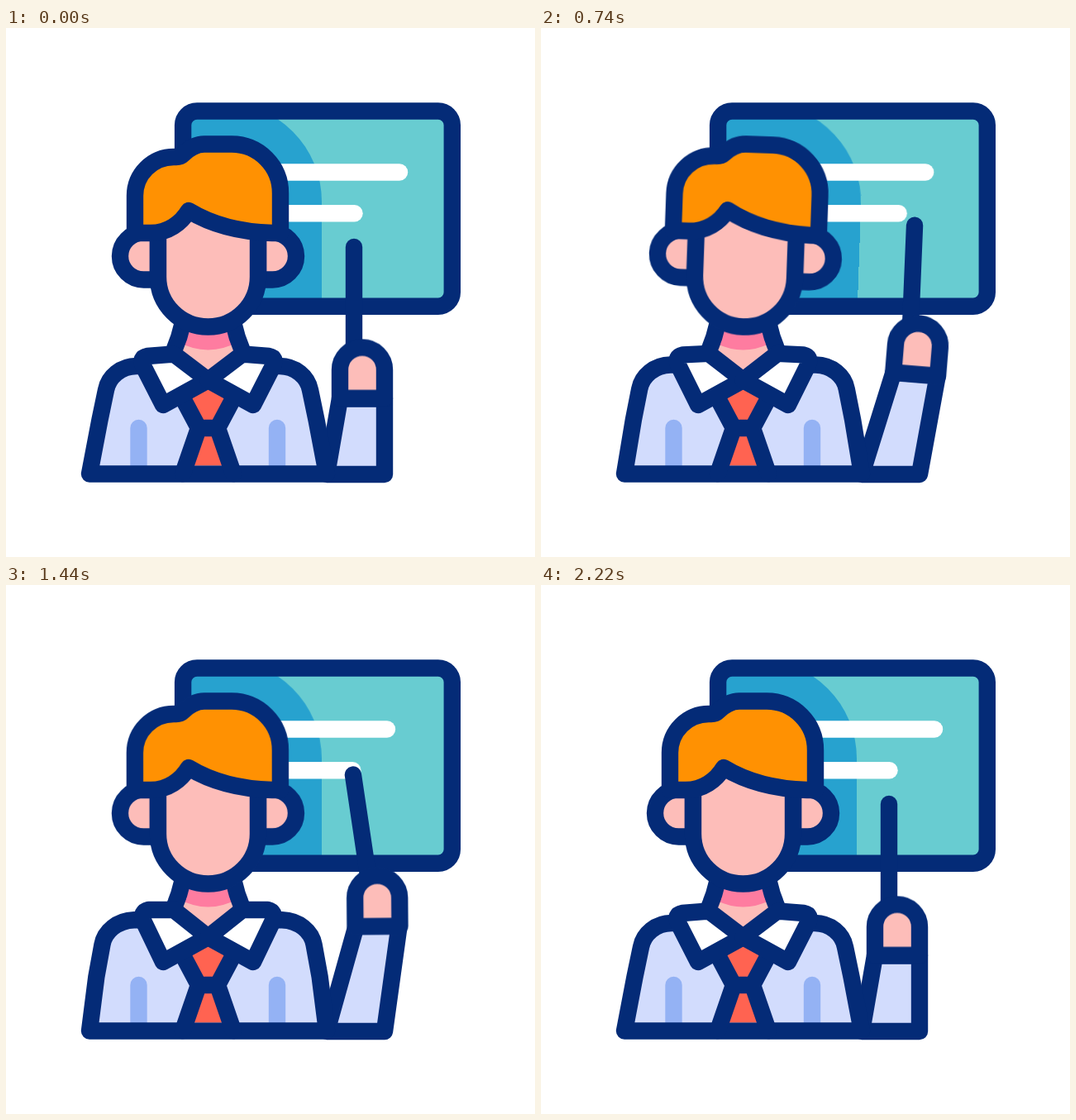
Recreate the animation shown at these times as an HTML page. Size 640 px wide and 640 px high, loop 2420 ms.

```html
<!DOCTYPE html>
<html lang="en">
<head>
<meta charset="utf-8">
<title>Teacher at the board</title>
<style>
  html, body { margin: 0; width: 100%; height: 100%; overflow: hidden; background: #fff; }
  svg { display: block; width: 100vw; height: 100vh; }

  .ink { stroke: #042b77; stroke-width: 20.4; stroke-linecap: round; stroke-linejoin: round; }
  .none { fill: none; }
  .skin { fill: #fdbdb9; }
  .shirt { fill: #d2dcfd; }
  .white { fill: #fff; }
  .chalk { stroke: #fff; stroke-width: 20.4; stroke-linecap: round; }
  .fold { stroke: #94b2f4; stroke-width: 20.4; stroke-linecap: round; }

  .tilt, .line1, .line2, .hand, .pointer, .sleeve, .body, .collar {
    animation: 2420ms cubic-bezier(.55, 0, .45, 1) infinite;
  }
  .tilt { transform-origin: 244.5px 358px; animation-name: tilt; }
  .line1 { animation-name: line1; }
  .line2 { animation-name: line2; }
  .hand { animation-name: hand; }
  .pointer { animation-name: pointer; }
  .sleeve { animation-name: sleeve; }
  .body { animation-name: body; animation-timing-function: cubic-bezier(.33, 0, .67, 1); }
  .collar { animation-name: collar; animation-timing-function: cubic-bezier(.33, 0, .67, 1); }

  @keyframes tilt {
    0%, 22.934% { transform: rotate(0deg); }
    45.661% { transform: rotate(10.5deg); }
    69.835% { transform: rotate(-5.5deg); animation-timing-function: cubic-bezier(.33, 0, .67, 1); }
    91.736%, 100% { transform: rotate(0deg); }
  }
  @keyframes line1 {
    0%, 22.934% { transform: translateX(0); }
    45.661% { transform: translateX(-56.5px); }
    69.835% { transform: translateX(6.3px); animation-timing-function: cubic-bezier(.33, 0, .67, 1); }
    91.736%, 100% { transform: translateX(0); }
  }
  @keyframes line2 {
    0%, 22.934% { transform: translateX(0); }
    45.661% { transform: translateX(58px); }
    69.835% { transform: translateX(-33.5px); animation-timing-function: cubic-bezier(.33, 0, .67, 1); }
    91.736%, 100% { transform: translateX(0); }
  }
  @keyframes hand {
    0% { transform: translate(431px, 413.5px) rotate(0deg); }
    22.314% { transform: translate(445px, 384.5px) rotate(0deg); }
    45.041% { transform: translate(492px, 384.5px) rotate(20deg); }
    71.901% { transform: translate(419.2px, 374.3px) rotate(-14.8deg); animation-timing-function: cubic-bezier(.33, 0, .67, 1); }
    91.736%, 100% { transform: translate(431px, 413.5px) rotate(0deg); }
  }
  @keyframes pointer {
    0% { d: path("M421 265 L421 386"); }
    22.314% { d: path("M434 239 L434 357.5"); }
    45.041% { d: path("M511.5 237.5 L490.5 355.3"); }
    71.901% { d: path("M355.7 224 L401.7 351"); animation-timing-function: cubic-bezier(.33, 0, .67, 1); }
    91.736%, 100% { d: path("M421 265 L421 386"); }
  }
  @keyframes sleeve {
    0% { d: path("M404 448 L458 448 L458 540 L388 540 Z"); }
    22.314% { d: path("M418 419 L472 419 L458 540 L388 540 Z"); }
    45.041% { d: path("M454.6 408.2 L505.4 426.6 L458 540 L388 540 Z"); }
    71.901% { d: path("M402 415 L455 401.2 L458 540 L388 540 Z"); animation-timing-function: cubic-bezier(.33, 0, .67, 1); }
    91.736%, 100% { d: path("M404 448 L458 448 L458 540 L388 540 Z"); }
  }
  @keyframes body {
    0%, 22.314%, 89.256%, 100% {
      d: path("M101 539.5 L113.5 474 L121 438 C124 422 139 409 158 409 L331 409 C350 409 365 422 368 438 L375.5 474 L388 539.5 Z");
    }
    45.455% {
      d: path("M101 539.5 L108 474 L115 434 C118 418 133 405 154 404 L335 404 C356 405 371 418 374 434 L381 474 L388 539.5 Z");
    }
  }
  @keyframes collar {
    0%, 22.314%, 89.256%, 100% {
      d: path("M171 397 L203 394.5 L244.5 426 L190 456 L166 409 Q161 399 171 397 Z");
    }
    45.455% {
      d: path("M173 391.5 L203 392.5 L244.5 426 L190 456 L166 405 Q163 394 173 391.5 Z");
    }
  }
</style>
</head>
<body>
<svg viewBox="0 0 640 640">
  <defs>
    <clipPath id="screen"><rect x="214" y="100.5" width="326" height="236.5" rx="16"/></clipPath>
  </defs>

  <!-- board -->
  <g clip-path="url(#screen)">
    <rect x="204" y="90" width="346" height="257" fill="#68ccd1"/>
    <path class="tilt" fill="#27a2cf" d="M100 460 V90 H262 A120 120 0 0 1 382 210 V460 Z"/>
    <path class="chalk line1" d="M250 174.5 H476"/>
    <path class="chalk line2" d="M260 224.3 H421.5"/>
  </g>
  <rect class="ink none" x="214.1" y="100.5" width="325.7" height="236.3" rx="17"/>

  <!-- arm -->
  <path class="ink none pointer" d="M421 265 L421 386"/>
  <path class="ink shirt sleeve" d="M404 448 L458 448 L458 540 L388 540 Z"/>
  <path class="ink skin hand" d="M-27 34.5 V0 A27 27 0 0 1 27 0 V34.5 Z"/>

  <!-- torso -->
  <path class="shirt body"/>
  <path class="fold" d="M160.5 484 V535 M328 484 V535"/>
  <path class="ink none body"/>

  <!-- neck and tie -->
  <path class="skin" d="M213 355 H276 L284 388 L286 394 L244.5 426 L203 394 L205 388 Z"/>
  <path fill="#fe7ca0" d="M212 355 H277 L282 379 Q244.5 400 207 379 Z"/>
  <path class="ink none" d="M213 360 Q210 374 204 388 M276 360 Q279 374 285 388"/>
  <path fill="#ff6351" d="M216 452 L244.5 428 L273 452 L256 484 L271 529.3 H218 L233 484 Z"/>
  <path class="ink none" d="M216 452 L233 484 H256 L273 452 M233 484 L214 539 M256 484 L275 539"/>
  <path class="ink white collar"/>
  <g transform="matrix(-1 0 0 1 489 0)"><path class="ink white collar"/></g>

  <!-- head -->
  <g class="tilt">
    <path class="ink skin" d="M184 247.5 H166.5 A28.5 28.5 0 0 0 166.5 304.5 H184 Z M305 247.5 H322.5 A28.5 28.5 0 0 1 322.5 304.5 H305 Z"/>
    <path class="ink skin" d="M184 218 V301 A60.5 60.5 0 0 0 305 301 V218"/>
    <path class="ink" fill="#ff9102" d="M156 248 V203 A47 47 0 0 1 203 156 H206 Q211 156 214 153 C221 146 229 140.5 240 140.5 H273 A59 59 0 0 1 332 200 V248 H322 C285 247 249 238 221 221 C212 236 196 248 175 248 Z"/>
  </g>
</svg>
</body>
</html>
```
